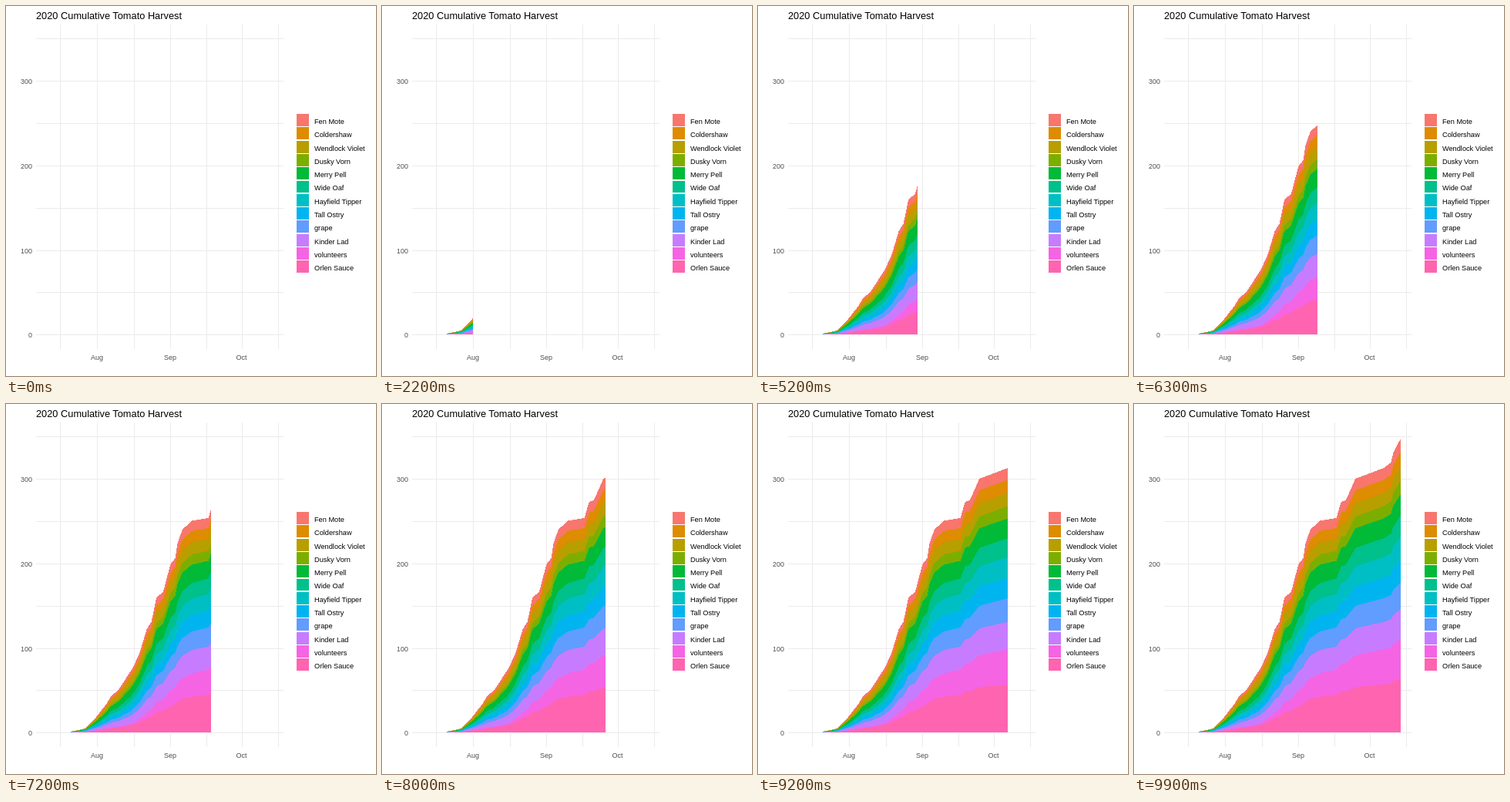
An HTML page that plays this animation: 480 by 480 pixels, repeating every 10000 ms.

```html
<!DOCTYPE html>
<html lang="en">
<head>
<meta charset="utf-8">
<title>Tomato Harvest</title>
<style>
  html, body { margin: 0; width: 100%; height: 100%; overflow: hidden; background: #fff; }
  svg { display: block; width: 480px; height: 480px; font: 9px "Liberation Sans", Arial, sans-serif; }
  rect, polygon { shape-rendering: crispEdges; }
</style>
</head>
<body>
<svg id="chart" viewBox="0 0 480 480"></svg>
<script>
const chart = document.getElementById('chart');
const BASE = 426, FIRST_DAY = 10, LAST_DAY = 95, LAST_STEP = 99, STEP_MS = 100;

// Key points of the whole stack: [day, height in px]
const total = [
  [10, 1], [16, 5], [21, 21], [25, 37], [27, 47], [30, 55], [36, 83], [39, 103],
  [42, 134], [44, 143.5], [46, 174], [49, 183], [52, 218], [54, 226], [55, 245], [57, 263],
  [61, 274.5], [68, 278], [70, 299], [72, 301], [76, 329], [88, 343], [91, 350], [92, 363], [95, 380.5]
];

// Top to bottom: name, colour, early and late share in percent
const layers = [
  ['Fen Mote', '#F8766D', 6, 4.4],
  ['Coldershaw', '#DE8C00', 7, 4.9],
  ['Wendlock Violet', '#B79F00', 9.5, 4.7],
  ['Dusky Vorn', '#7CAE00', 5, 4.6],
  ['Merry Pell', '#00BA38', 14, 7.1],
  ['Wide Oaf', '#00C08B', 8, 7.2],
  ['Hayfield Tipper', '#00BFC4', 8, 7.8],
  ['Tall Ostry', '#00B4F0', 8, 7.7],
  ['grape', '#619CFF', 8, 9],
  ['Kinder Lad', '#C77CFF', 13, 10.3],
  ['volunteers', '#F564E3', 2, 13.8],
  ['Orlen Sauce', '#FF64B0', 11.5, 18.5]
];

const xOf = day => 53.35 + 3.0765 * day;

function add(parent, tag, attrs, text) {
  const el = document.createElementNS('http://www.w3.org/2000/svg', tag);
  for (const key in attrs) el.setAttribute(key, attrs[key]);
  if (text) el.textContent = text;
  return parent.appendChild(el);
}
const box = (parent, x, y, width, height, fill) => add(parent, 'rect', { x, y, width, height, fill });
const label = (x, y, text, attrs) => add(chart, 'text', { x, y, ...attrs }, text);

function heightAt(day) {
  const i = Math.max(1, total.findIndex(p => p[0] >= day));
  const [d0, h0] = total[i - 1], [d1, h1] = total[i];
  return h0 + (h1 - h0) * (day - d0) / (d1 - d0);
}

// Shares drift from early to late values, fast at first
function shareAt(day, [, , early, late]) {
  const k = Math.min(1, Math.exp((35 - day) / 18));
  return (late + (early - late) * k) / 100;
}

// Grid, axes and title
for (let i = 0; i < 8; i++) box(chart, 39, Math.floor(426.8 - 54.87 * i), 321, 1, '#EBEBEB');
for (const x of [70, 118, 166, 213, 260, 306, 353]) box(chart, x, 24, 1, 421, '#EBEBEB');
for (let i = 0; i < 4; i++)
  label(34, Math.round(430.3 - 109.75 * i), String(100 * i), { 'text-anchor': 'end', fill: '#4D4D4D' });
[['Aug', 118], ['Sep', 213], ['Oct', 305.5]].forEach(([month, x]) =>
  label(x, 459, month, { 'text-anchor': 'middle', fill: '#4D4D4D' }));
label(39, 17, '2020 Cumulative Tomato Harvest', { 'font-size': 12.8 });

// Legend
layers.forEach(([name, color], i) => {
  box(chart, 377, 140.2 + 17.28 * i, 16, 15.8, color);
  label(400, Math.round(153 + 17.28 * i), name, { 'font-size': 9.2 });
});

// Each area reaches down to the base line and is covered by the next one
const clip = box(add(chart, 'clipPath', { id: 'reveal' }), 0, 0, 0, 480);
const areas = add(chart, 'g', { 'clip-path': 'url(#reveal)' });
layers.forEach(([, color], i) => {
  const points = [[xOf(FIRST_DAY), BASE]];
  for (let day = FIRST_DAY; day <= LAST_DAY; day++) {
    const share = layers.slice(i).reduce((sum, layer) => sum + shareAt(day, layer), 0);
    points.push([xOf(day), BASE - heightAt(day) * share]);
  }
  points.push([xOf(LAST_DAY), BASE]);
  add(areas, 'polygon', { points: points.join(' '), fill: color });
});

// Every day lands on a whole step; the steps left over fall halfway between two days
function dayAt(step) {
  const pos = step * LAST_DAY / LAST_STEP, day = Math.round(pos);
  return Math.round(day * LAST_STEP / LAST_DAY) === step ? day : Math.floor(pos) + .5;
}

const start = performance.now();
function draw() {
  const step = Math.floor((performance.now() - start) / STEP_MS) % (LAST_STEP + 1);
  // The first day on its own has no width, so nothing shows before the second
  const day = dayAt(step);
  clip.setAttribute('width', day > FIRST_DAY ? Math.round(xOf(day)) : 0);
  requestAnimationFrame(draw);
}
draw();
</script>
</body>
</html>
```
